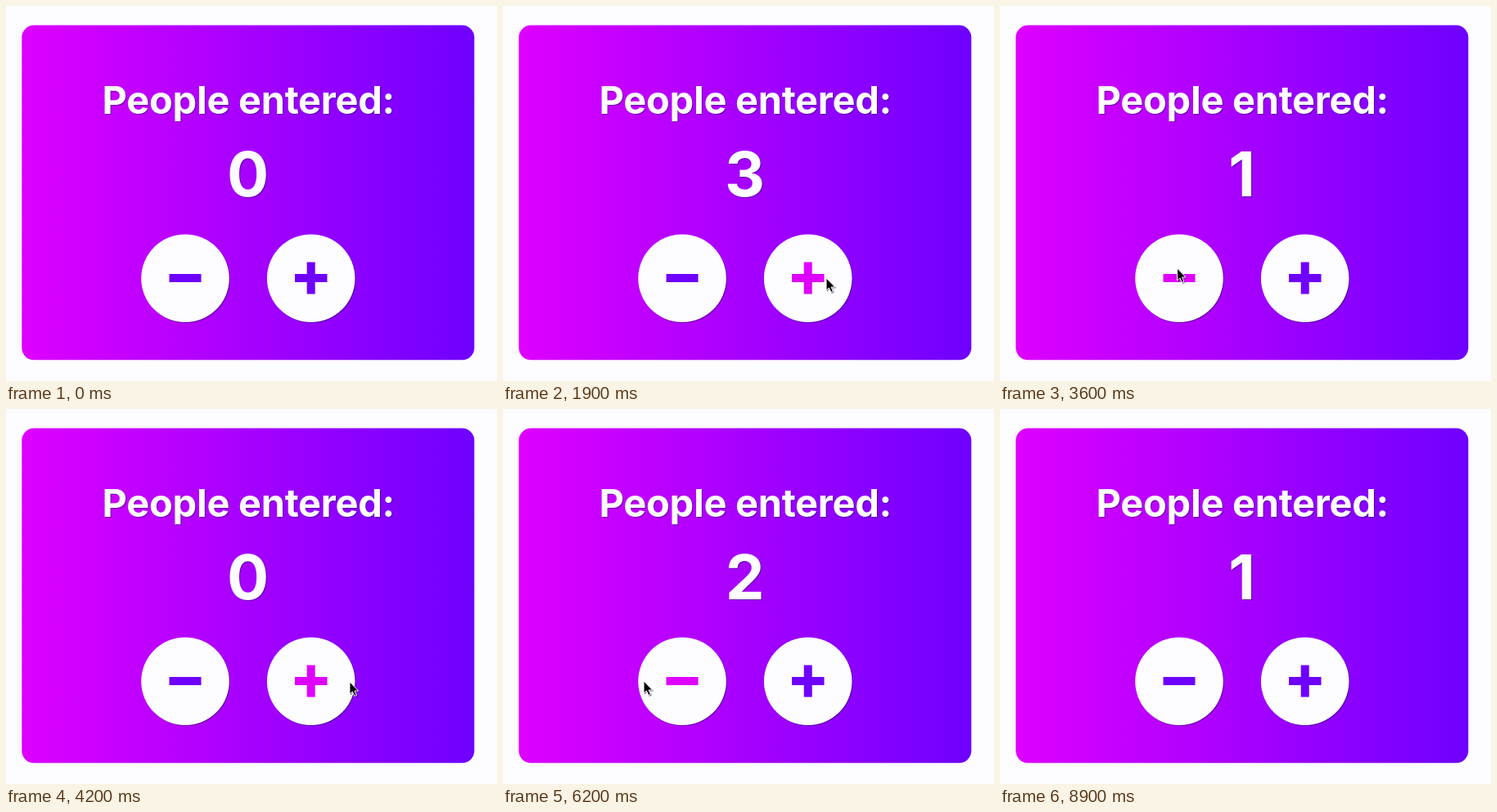
Recreate the animation shown at these times as an HTML page. Size 600 by 459 pixels, loop 9 s.

```html
<!DOCTYPE html>
<html lang="en">
<head>
<meta charset="utf-8">
<title>People counter</title>
<style>
  html, body { margin: 0; width: 100%; height: 100%; overflow: hidden; background: #fdfcff; }
  svg { display: block; width: 100vw; height: 100vh; }
  text { font-family: Inter, "Liberation Sans", sans-serif; font-weight: 700; fill: #fdfcff; text-anchor: middle; }
  .title { font-size: 47px; letter-spacing: -.006em; }
  .count { font-size: 76px; }
  .raised { filter: drop-shadow(1px 1px .5px rgba(30, 0, 80, .5)); }
  .disc { fill: #fdfcff; }
  .sign { stroke: #6e00ff; stroke-width: 10; }
  .sign.hover { stroke: #df00ff; }
</style>
</head>
<body>
<svg viewBox="0 0 600 459">
  <defs>
    <linearGradient id="fade">
      <stop offset="0" stop-color="#de00ff"/>
      <stop offset="1" stop-color="#6e00ff"/>
    </linearGradient>
  </defs>
  <rect x="19.3" y="23.5" width="553" height="409.8" rx="15" fill="url(#fade)"/>
  <g class="raised">
    <text class="title" x="296.3" y="132.4">People entered:</text>
    <text class="count" id="count" x="295.6" y="232.6">0</text>
    <circle class="disc" cx="219" cy="333.3" r="53.8"/>
    <circle class="disc" cx="372.7" cy="333.3" r="53.8"/>
  </g>
  <path class="sign" id="minus" d="M199.5 333h39"/>
  <path class="sign" id="plus" d="M353 333h39.5M372.7 313.5v39"/>
  <path class="raised" id="cursor" stroke="#fdfcff" stroke-linejoin="round"
        d="M0 0V15L3.4 12L5.8 17.4L8.4 16.3L6 11H10.6Z"/>
</svg>
<script>
const LOOP = 9000, STEP = 100;
const el = id => document.getElementById(id);
const minus = { sign: el('minus'), x: 219, change: -1 };
const plus = { sign: el('plus'), x: 372.7, change: 1 };

// The pointer rests at each stop and glides between them; presses spread evenly over a rest.
const stops = [
  { x: 400, y: 475, from: 0, to: 200 },
  { x: 395, y: 333, from: 700, to: 2400, button: plus, presses: 4 },
  { x: 216.5, y: 321, from: 2900, to: 3900, button: minus, presses: 4 },
  { x: 420, y: 334, from: 4200, to: 5500, button: plus, presses: 2 },
  { x: 172, y: 333, from: 6000, to: 6600, button: minus, presses: 1 },
  { x: 200, y: 475, from: 6900, to: LOOP }
];

const clamp = u => Math.min(1, Math.max(0, u));
const ease = u => u * u * (3 - 2 * u);

function pointerAt(t) {
  const i = stops.findIndex(stop => t < stop.to);
  const b = stops[i], a = stops[i - 1] || b;
  const u = a === b ? 1 : ease(clamp((t - a.to) / (b.from - a.to)));
  return { x: a.x + (b.x - a.x) * u, y: a.y + (b.y - a.y) * u };
}

function countAt(t) {
  return stops.filter(stop => stop.button).reduce((sum, { from, to, button, presses }) => {
    const done = Math.floor(clamp((t - from) / (to - from)) * (presses + 1));
    return sum + button.change * Math.min(done, presses);
  }, 0);
}

function draw(t) {
  const { x, y } = pointerAt(t);
  el('cursor').setAttribute('transform', `translate(${x} ${y})`);
  for (const button of [minus, plus])
    button.sign.classList.toggle('hover', Math.hypot(x - button.x, y - 333.3) < 54);
  el('count').textContent = countAt(t);
}

const start = performance.now();
function tick() {
  const t = (performance.now() - start) % LOOP;
  draw(Math.floor(t / STEP) * STEP);
  requestAnimationFrame(tick);
}
tick();
</script>
</body>
</html>
```
